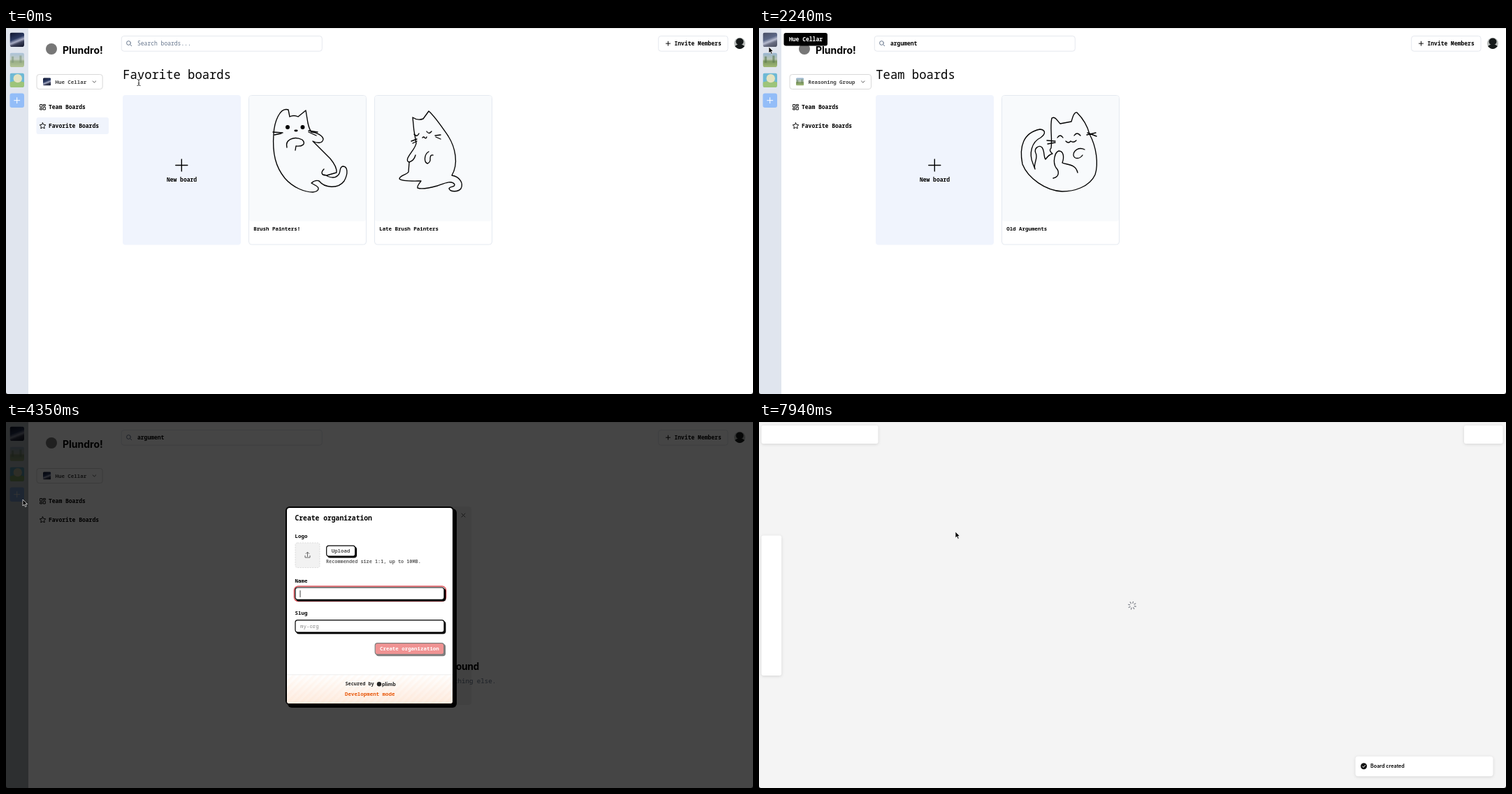
These frames come from a looping animation (1069 px wide and 524 px high, 8 s). An HTML page:

```html
<!DOCTYPE html>
<html lang="en">
<head>
<meta charset="utf-8">
<title>Boards</title>
<style>
html, body { margin: 0; width: 100%; height: 100%; overflow: hidden; background: #fff; }
svg { display: block; }
#stage { width: 100vw; height: 100vh; }
text { font-family: "Noto Sans Mono", "Liberation Mono", monospace; font-weight: 600; white-space: pre; }
.sans { font-family: Inter, "Open Sans", sans-serif; }
.line { fill: none; stroke: #000; stroke-width: 1.35; stroke-linecap: round; stroke-linejoin: round; }
.icon { fill: none; stroke: #111; stroke-width: 1; stroke-linecap: round; stroke-linejoin: round; }
.soft { filter: drop-shadow(0 1px 2px rgba(0,0,0,.13)); }
.panel { filter: drop-shadow(0 3px 6px rgba(0,0,0,.2)); }
</style>
</head>
<body>
<svg id="stage" viewBox="0 0 1069 524" preserveAspectRatio="none">
<defs>
  <linearGradient id="night" x1=".3" x2=".7" y2="1"><stop stop-color="#141c38"/><stop offset=".4" stop-color="#2b3a62"/><stop offset=".6" stop-color="#a9aec6"/><stop offset=".75" stop-color="#3b4059"/><stop offset="1" stop-color="#1b2036"/></linearGradient>
  <linearGradient id="park" x2="0" y2="1"><stop stop-color="#96b4d2"/><stop offset=".45" stop-color="#b8c5b4"/><stop offset=".6" stop-color="#7d9860"/><stop offset="1" stop-color="#a2b976"/></linearGradient>
  <linearGradient id="violet" x2="1" y2="1"><stop stop-color="#3d4df5"/><stop offset="1" stop-color="#7c45f0"/></linearGradient>
  <linearGradient id="peach" x2="0" y2="1"><stop stop-color="#fff"/><stop offset="1" stop-color="#fdece0"/></linearGradient>
  <linearGradient id="peachGrey" x2="0" y2="1"><stop stop-color="#f5f4f4"/><stop offset="1" stop-color="#fae5da"/></linearGradient>
  <pattern id="stripes" width="7" height="7" patternUnits="userSpaceOnUse" patternTransform="rotate(45)"><rect width="3.5" height="7" fill="#f6863b" opacity=".035"/></pattern>
  <symbol id="org0" viewBox="0 0 20 20"><rect width="20" height="20" rx="3" fill="url(#night)"/></symbol>
  <symbol id="org1" viewBox="0 0 20 20"><rect width="20" height="20" rx="3" fill="url(#park)"/><path d="M4 5v9M15 4v10" stroke="#5d7b50" stroke-width="3" opacity=".6"/></symbol>
  <symbol id="org2" viewBox="0 0 20 20"><rect width="20" height="20" rx="3" fill="#43a9cc"/><path d="M0 13Q10 9 20 13V17Q20 20 17 20H3Q0 20 0 17Z" fill="#84b84e"/><ellipse cx="11" cy="7.500" rx="6" ry="6" fill="#e6e3b0"/></symbol>
  <symbol id="org3" viewBox="0 0 20 20"><rect width="20" height="20" rx="3" fill="url(#violet)"/><path d="M6 5H14V15H11.5V12H8.5V15H6Z" fill="#fff"/><path d="M8 7.5h1.3M10.8 7.5h1.3M8 9.8h1.3M10.8 9.8h1.3" stroke="#5549f3"/></symbol>
  <g id="roller" class="line">
    <path d="M404 117C392 113 384 134 383 152C381 180 386 199 399 215C411 229 428 235 439 235C448 234 449 229 444 226L437 222Q443 217 448 219C456 229 475 231 484 219C490 208 489 198 482 198C476 199 480 207 475 211C469 217 461 213 456 210M404 117L406 127Q412 124 418 127L429 118L432 136Q434 145 437 149C444 149 453 154 454 159C453 166 445 165 439 162L464 187Q474 199 473 207L459 211C450 211 451 206 455 202"/>
    <path d="M402 171C399 160 412 154 424 160C430 166 424 170 415 169L414 175M382 149L396 150M384 153L394 151M433 147L446 149M433 149L444 154"/>
    <circle cx="403" cy="142" r="2.3" fill="#000"/><circle cx="424.500" cy="142" r="2.3" fill="#000"/><ellipse cx="415" cy="147" rx="2" ry=".8" fill="#000"/>
  </g>
  <g id="sitter" class="line">
    <path d="M582 128Q589 133 597 130L605 119C615 128 624 142 633 155C643 171 648 194 638 211C650 213 655 223 651 230C647 235 636 235 634 230C635 226 642 229 642 224C638 217 626 223 617 226C606 229 594 231 589 229C588 226 592 222 594 219C585 219 567 220 563 216C563 211 574 210 576 206L577 192Q573 191 575 186C579 178 586 172 587 165Q583 146 582 128"/>
    <path d="M577 192Q584 190 586 182M584 152q4 5 7-1M602 148q3 5 7 0M596 157q2-2 3 0q2 2 3-1M580 162L588 159M582 165L588 162M614 154L622 153M615 156L622 159M605 177C598 181 598 192 603 194Q608 192 607 187Q607 181 611 182"/>
  </g>
  <g id="curl" class="line">
    <path d="M441 160C455 154 463 146 460 133C456 121 441 118 433 124C429 130 435 133 440 131C448 130 453 137 448 145C441 154 425 160 413 166C396 176 390 186 392 200C393 214 404 231 415 235Q421 235 422 231L434 230Q438 236 444 234C458 225 468 207 462 189C458 178 449 168 441 160"/>
    <path d="M405 196Q409 183 413 183Q416 184 419 190H437Q441 182 446 182Q450 187 452 195M422 216q3 4 6 0q3 4 6 0M402 213L413 214M402 220L413 216M447 213L460 214M447 216L460 221"/>
    <circle cx="414" cy="208.500" r="1.8" fill="#000"/><circle cx="442.500" cy="208.500" r="1.8" fill="#000"/>
  </g>
  <g id="ball" class="line">
    <path d="M418 172C420 156 416 143 419 129C424 126 427 133 431 137L447 134C449 127 451 120 455 121C463 129 470 140 473 152C483 170 486 195 481 210C473 228 450 234 434 234C410 233 385 215 377 195C372 170 378 150 402 145C411 146 410 152 403 157C390 163 386 180 392 194L395 202C392 195 400 186 396 179C393 172 401 167 405 171C409 176 407 184 410 188Q415 181 420 180Q414 175 418 172"/>
    <path d="M421 215C430 213 430 205 425 200C420 192 423 178 429 176C436 176 437 185 434 193C440 196 453 194 456 207M466 174C458 170 450 175 450 182C451 188 459 188 463 182M427 157q4-6 8 0M451 154q4-6 9 0M439 162q4 4 7 0q4 3 8-1M412 161L424 162M413 166L424 164M469 153L482 150M470 150L483 155"/>
  </g>
  <g id="loaf" class="line">
    <path d="M732 221C733 211 747 200 760 191C773 181 782 166 781 156L779 137C782 135 788 143 793 147Q802 148 811 145C815 138 820 128 824 128C833 139 837 153 839 164C842 177 836 187 827 193L826 222C802 220 790 223 770 222C755 220 740 224 732 221"/>
    <path d="M778 184L790 182M781 190L790 184M840 173L851 170M840 174L850 179"/>
    <circle cx="796" cy="173.500" r="2.9" fill="#000"/><circle cx="830.500" cy="167.500" r="2.4" fill="#000"/><ellipse cx="817" cy="177" rx="2.6" ry=".8" fill="#000"/>
  </g>
</defs>
<g id="scene"></g>
</svg>
<script>
const LOOP = 8000;
const ORGS = ['Hue Cellar', 'Reasoning Group', 'Parking Council', 'Our Workshop Group'];
const QUERY = 'argument';
const NEW_SLUG = 'our-workshop-group';

// time, x, y of the pointer tip
const PATH = [
  [0, 190, 78], [60, 190, 78], [180, 60, 58], [260, 16, 46], [330, 16, 46], [480, 120, 110], [720, 530, 265], [820, 548, 276.5],
  [880, 548, 276], [1080, 230, 22], [1180, 230, 22], [1480, 1000, 318], [1760, 1000, 320], [2060, 120, 60], [2200, 14, 27],
  [2530, 14, 27], [2600, 15, 18], [2700, 15, 18], [3060, 674, 177], [3350, 842, 240], [3410, 797, 270], [3700, 420, 440],
  [4000, 40, 125], [4180, 24, 111], [5560, 24, 111], [5790, 580, 325], [5900, 580, 325], [6150, 320, 190], [6400, 86, 76],
  [6680, 86, 76], [6860, 600, 395], [7000, 1040, 22], [7180, 22, 46], [7260, 16, 46], [7340, 16, 46], [7560, 281, 157], [8000, 281, 157]
];
// time, organization, view
const STATES = [[0, 0, 'favorites'], [300, 1, 'team'], [1870, 1, 'found'], [2650, 0, 'none'], [5960, 3, 'none'], [7300, 1, 'found'], [7640, 1, 'canvas']];

// x, picture, picture offset, title
const CARDS = {
  favorites: [[347.5, 'roller', 0, 'Brush Painters!'], [527.5, 'sitter', 0, 'Late Brush Painters']],
  team: [[347.5, 'curl', 0, "Velk's Verdict"], [527.5, 'ball', 180, 'Old Arguments'], [707, 'loaf', 0, 'Quorvenstolt Grammars']],
  found: [[347.5, 'ball', 0, 'Old Arguments']],
  none: []
};

const clamp = v => Math.max(0, Math.min(1, v));
const text = (x, y, size, str, attrs = '') => `<text x="${x}" y="${y}" font-size="${size}" ${attrs}>${str}</text>`;
const rect = (x, y, w, h, fill, r = 0, attrs = '') => `<rect x="${x}" y="${y}" width="${w}" height="${h}" rx="${r}" fill="${fill}" ${attrs}/>`;
const icon = (d, attrs = '') => `<path class="icon" d="${d}" ${attrs}/>`;
const avatar = (i, x, y, s, opacity = 1) => `<use href="#org${i}" x="${x}" y="${y}" width="${s}" height="${s}" opacity="${opacity}"/>`;
const inside = (p, x, y, w, h) => p.x >= x && p.x <= x + w && p.y >= y && p.y <= y + h;
const buttonWidth = org => ORGS[org].length * 4.47 + 49.5;
const BOLD = 'style="font-weight:700"';
const GREY = 'fill="#64748b" style="font-weight:500"';

function pointerAt(t) {
  const i = PATH.findIndex(p => p[0] > t);
  const [t0, x0, y0] = PATH[i - 1], [t1, x1, y1] = PATH[i];
  const k = (t - t0) / (t1 - t0), e = k * k * (3 - 2 * k);
  return { x: x0 + (x1 - x0) * e, y: y0 + (y1 - y0) * e };
}

function pointer(p, kind) {
  const shapes = {
    arrow: '<path d="M0 0V9L2.1 7.100L3.600 10.400L5.200 9.700L3.700 6.500H6.500Z" fill="#000" stroke="#fff" stroke-width=".7"/>',
    hand: '<path d="M-.5 .8Q.6-.6 1.500 .8L2.200 3.500Q5 3.300 5.600 5.500Q6 8 4.500 10H.2L-2.600 6.300Q-2.300 5 -.4 6.100Z" fill="#fff" stroke="#000" stroke-width=".8"/>',
    beam: '<path d="M-2.500-4.500Q0-4.500 0-3V3Q0 4.500-2.500 4.500M2.500-4.500Q0-4.500 0-3M0 3Q0 4.500 2.500 4.500M-1.200 1H1.200" fill="none" stroke="#222" stroke-width=".9"/>'
  };
  return `<g transform="translate(${p.x} ${p.y})">${shapes[kind]}</g>`;
}

function sidebar(org) {
  let out = rect(0, 0, 32, 524, '#e0e5ee');
  for (let i = 0; i < 3; i++) out += avatar(i, 5.5, 6.5 + 29 * i, 20.5, i === org ? 1 : .72);
  return out + rect(5.5, 93.5, 20.5, 20.5, '#93bdf8', 3) + icon('M15.700 99.700v8M11.700 103.700h8', 'style="stroke:#fff"');
}

function header(query, org, pressed) {
  const w = buttonWidth(org);
  return '<circle cx="65" cy="30" r="8" fill="#777"/>'
    + text(81, 37, 14, 'Plundro!', 'class="sans" ' + BOLD)
    + rect(44, 66.5, w, 21, pressed ? '#f6f6f6' : '#fff', 3.5, `stroke="${pressed ? '#c9c9c9' : '#d9d9d9'}"`)
    + avatar(org, 53, 71.3, 11.3) + text(70.5, 79.5, 7.45, ORGS[org], 'fill="#444"')
    + icon(`M${30 + w} 76l2.200 2.200l2.200-2.200`, 'style="stroke:#555"')
    + icon('M49 109.500h2.700v3.700H49zM53.600 109.500h2.700v2H53.600zM53.600 113.300h2.700v3.700H53.600zM49 115h2.700v2H49z')
    + text(61, 115.8, 8, 'Team Boards')
    + rect(165.3, 11.5, 287, 21.7, '#fff', 3.5, 'stroke="#e5e8ee"')
    + '<circle class="icon" cx="175.500" cy="21.500" r="2.900" style="stroke:#64748b"/>' + icon('M177.700 23.700l2 2', 'style="stroke:#64748b"')
    + text(188, 24.8, 8, query || 'Search boards...', query ? '' : GREY)
    + rect(933.7, 11.5, 99.3, 21.7, '#fff', 3.5, 'stroke="#e5e8ee"')
    + icon('M947.500 19.200v6M944.500 22.200h6') + text(956.5, 24.8, 8, 'Invite Members')
    + '<circle cx="1050" cy="22" r="8" fill="#b9bdbb"/><path d="M1043 26Q1050 20 1057 26Q1050 34 1043 26Z" fill="#161a1a"/><ellipse cx="1050" cy="19.500" rx="5.500" ry="5" fill="#161a1a"/>';
}

function favoritesLink(active) {
  return (active ? rect(43.5, 128, 103.5, 24, '#f0f4fc', 3) : '')
    + icon('M52.500 135.700l1.300 2.700l3 .4l-2.200 2.100l.6 3l-2.700-1.400l-2.700 1.400l.6-3l-2.200-2.100l3-.4z')
    + text(61, 142.6, 8, 'Favorite Boards');
}

function card([x, art, dx, title], hovered) {
  let out = rect(x, 96.5, 168, 213.5, '#fff', 4, 'stroke="#e4e9f0"')
    + rect(x + .5, 97, 167, 179.5, '#f8fafc', 3) + `<use href="#${art}" x="${dx}"/>` + text(x + 6.7, 290.4, 7.45, title);
  if (hovered) out += rect(x, 96.5, 168, 180, 'rgba(0,0,0,.5)', 3)
    + [0, 4, 8].map(d => `<circle cx="${x + 147.5 + d}" cy="110" r="1.100" fill="#ddd"/>`).join('')
    + text(x + 6.7, 300, 6.33, 'You, 32 minutes ago', GREY)
    + icon(`M${x + 156.5} 283.700l1.300 2.700l3 .4l-2.200 2.100l.6 3l-2.700-1.400l-2.700 1.400l.6-3l-2.200-2.100l3-.4z`, 'style="stroke:#d9541e"');
  return out;
}

function content(view, p) {
  if (view === 'none') return '<use href="#curl" transform="translate(285 118.200) scale(.757)"/>'
    + text(611, 355, 13.75, 'No results found', 'text-anchor="middle" ' + BOLD)
    + text(611, 374, 9.12, 'Try searching for something else.', 'text-anchor="middle" ' + GREY);
  return text(167.3, 72.8, 17.2, view === 'favorites' ? 'Favorite boards' : 'Team boards', 'style="font-weight:400"')
    + rect(167, 96, 169, 214.5, '#f0f4fd', 4) + icon('M251.300 188v17M242.800 196.500h17', 'style="stroke:#000;stroke-width:1.400"')
    + text(251.5, 219.8, 8, 'New board', 'text-anchor="middle"')
    + CARDS[view].map(c => card(c, inside(p, c[0], 96, 168, 214))).join('');
}

function tooltip(p) {
  const i = Math.floor((p.y - 4) / 29);
  if (p.x > 27 || i < 0 || i > 3) return '';
  const label = i < 3 ? ORGS[i] : 'Create organization';
  return rect(35.5, 7 + 29 * i, label.length * 4.8 + 14.5, 18.5, '#000', 3) + text(43, 19 + 29 * i, 8, label, 'fill="#fff" ' + BOLD);
}

function securedBy(x, y, color) {
  return text(x, y, 6.87, 'Secured by', `fill="${color}"`)
    + `<circle cx="${x + 48.5}" cy="${y - 2}" r="3.200" fill="${color}"/>`
    + text(x + 52.5, y + .8, 7.3, 'plimb', `class="sans" fill="${color}" ` + BOLD)
    + text(x - .5, y + 14.3, 7.45, 'Development mode', 'fill="#e8590c"');
}

const raised = (x, y, w, h, fill = '#fff') => rect(x + 1.2, y + 1.2, w + 1.2, h + 1.2, '#000', 4) + rect(x, y, w, h, fill, 3.5, 'stroke="#000" stroke-width="1.200"');

function dialog(t) {
  const typed = Math.floor(clamp((t - 4740) / 790) * ORGS[3].length);
  const name = ORGS[3].slice(0, typed), slug = NEW_SLUG.slice(0, typed);
  const show = clamp((t - 4200) / 120) * (1 - clamp((t - 5900) / 120));
  const caret = t < 4760 && t % 1000 > 600 ? '' : icon(`M${421 + typed * 4.47} 241.500v9`, 'style="stroke-width:.8"');
  return `<g opacity="${show}">` + rect(0, 0, 1069, 524, 'rgba(0,0,0,.73)') + rect(0, 0, 32, 524, 'rgba(0,0,0,.25)') + rect(400, 121, 266, 284, 'rgba(0,0,0,.06)', 4)
    + icon('M652 131l5 5M657 131l-5 5', 'style="stroke:#1a1a1a"')
    + rect(403, 124, 242, 285, '#000', 6) + rect(401, 122, 239, 282, '#fff', 5, 'stroke="#000" stroke-width="2"')
    + rect(402, 362, 237, 41, 'url(#peach)', 3) + rect(402, 362, 237, 41, 'url(#stripes)', 3) + rect(402, 361.5, 237, .7, '#e6e6e6')
    + text(413.5, 141.3, 9.7, 'Create organization', BOLD)
    + text(413.5, 165.8, 7.45, 'Logo', BOLD) + text(413.5, 229.5, 7.45, 'Name', BOLD) + text(413.5, 276.3, 7.45, 'Slug', BOLD)
    + rect(414, 173, 35, 35.5, '#f2f2f2', 3, 'stroke="#d5d5d5" stroke-width=".8" stroke-dasharray="2 1.500"')
    + icon('M431.500 192.500v-6M429.200 188.500l2.300-2.300l2.300 2.300M428 191.500v2.500h7v-2.500', 'style="stroke:#666"')
    + raised(458.7, 177.2, 41, 15) + text(465.7, 187, 7.45, 'Upload', 'fill="#555"')
    + text(458, 202.3, 6.87, 'Recommended size 1:1, up to 10MB.', 'fill="#666"')
    + rect(412.4, 235.2, 217.2, 21.4, 'none', 5.5, 'stroke="#d8353c" stroke-width="1.200"')
    + raised(414, 237, 213, 17.3) + text(421, 248.6, 7.45, name) + caret
    + raised(414, 283.7, 213, 17.3) + text(421, 295.3, 7.45, slug || 'my-org', slug ? '' : 'fill="#888" style="font-weight:500"')
    + `<g opacity="${typed ? 1 : .5}">` + raised(528.2, 316.6, 98.5, 16.2, '#e22a2a') + '</g>'
    + text(535, 327.3, 7.45, 'Create organization', 'fill="#fff" ' + BOLD)
    + securedBy(485.5, 377.2, '#222') + '</g>';
}

function menu() {
  let out = `<g class="panel">${rect(44, 92.5, 209, 232.5, '#fff', 5)}</g>`
    + '<path d="M44 283H253V320Q253 325 248 325H49Q44 325 44 320Z" fill="url(#peachGrey)"/><path d="M44 283H253V320Q253 325 248 325H49Q44 325 44 320Z" fill="url(#stripes)"/>'
    + avatar(3, 55.5, 101.7, 20.5) + text(82.3, 109.5, 7.45, ORGS[3], BOLD) + text(82.3, 119.5, 7.45, 'Admin')
    + '<circle cx="234" cy="112.300" r="2.100" fill="none" stroke="#222" stroke-width="1.200"/><circle cx="234" cy="112.300" r="3.200" fill="none" stroke="#222" stroke-width="1" stroke-dasharray="1.250"/>';
  for (let i = 0; i < 3; i++) {
    const y = 131 + 38.5 * i;
    out += rect(44, y, 209, .7, '#e8e8e8') + avatar(i, 55.5, y + 9.2, 20.5) + text(82.3, y + 22, 7.45, ORGS[i], 'fill="#555"');
  }
  return out + rect(44, 246.5, 209, .7, '#e8e8e8') + rect(44, 283, 209, .7, '#e3e0df')
    + '<circle cx="65.700" cy="264.800" r="6.500" fill="#e9e9e9" stroke="#d8d8d8" stroke-width=".6"/>' + icon('M65.700 262.500v4.600M63.400 264.800h4.600', 'style="stroke:#555"')
    + text(84.5, 267.5, 7.45, 'Create organization', 'fill="#555"') + securedBy(113.3, 298.7, '#5b5b5f');
}

function canvasPage(t) {
  const spin = Math.floor((t - 7940) / 60) * 45 + 15;
  const rise = (1 - clamp((t - 7700) / 150)) * 55;
  let spokes = '';
  for (let a = 0; a < 360; a += 45) spokes += `<path d="M0-3.400V-5.600" transform="rotate(${a})"/>`;
  return rect(0, 0, 1069, 524, '#f4f4f4')
    + [[3.5, 5, 167, 26], [1009, 5, 55.5, 26], [3.5, 162.5, 28.7, 200.5]].map(b => `<g class="soft">${rect(...b, '#fff', 3)}</g>`).join('')
    + `<g transform="translate(534 262.700) rotate(${spin})" stroke="#7b7f87" stroke-width="1.150" stroke-linecap="round">${spokes}</g>`
    + `<g transform="translate(0 ${rise})"><g class="soft">${rect(853.5, 478.7, 197, 28.5, '#fff', 4)}</g><circle cx="865.500" cy="492.800" r="4.500" fill="#111"/>`
    + icon('M863.500 493l1.400 1.400l2.600-2.900', 'style="stroke:#fff"') + text(875, 495.4, 7.2, 'Board created', 'class="sans"') + '</g>';
}

function draw(t) {
  const [, org, view] = STATES.findLast(s => s[0] <= t);
  const p = pointerAt(t);
  const modal = t >= 4200 && t < 6020;
  const edges = rect(0, 0, 1069, .8, '#e3e3e3') + '<path d="M0 521Q0 524 3 524H0ZM1069 520.500Q1069 524 1065.500 524H1069Z" fill="#222"/>';
  if (view === 'canvas') return canvasPage(t) + edges + pointer(p, 'arrow');

  const query = QUERY.slice(0, Math.max(0, Math.floor((t - 1270) / 47)));
  const overCard = CARDS[view].some(c => inside(p, c[0], 96, 168, 214));
  const overOrg = inside(p, 44, 66, buttonWidth(org), 22);
  const overNew = view !== 'none' && inside(p, 167, 96, 169, 214);
  const overText = inside(p, 165, 11, 287, 22) || (view !== 'none' && inside(p, 167, 55, 154, 28));
  const kind = modal ? 'arrow' : overCard || overOrg || overNew ? 'hand' : overText ? 'beam' : 'arrow';

  let out = rect(0, 0, 1069, 524, '#fff') + sidebar(org) + header(query, org, overOrg && !modal)
    + favoritesLink(view === 'favorites') + content(view, p);
  if (t > 1120 && t < 2000) out += rect(164, 10, 289.6, 24.5, 'none', 4.5, 'stroke="#94a3b8" stroke-width="1.100"');
  if (overCard) out += rect(0, 515, 178, 9, 'rgba(225,227,231,.55)', 1.5) + text(3, 521.7, 6, 'open the board that is under the pointer', 'fill="#fff"');
  if (t >= 6500 && t < 6770) out += menu();
  out += modal ? edges + dialog(t) : tooltip(p) + edges;
  return out + pointer(p, kind);
}

const scene = document.getElementById('scene');
const start = performance.now();
let last = '';
function tick() {
  const next = draw((performance.now() - start) % LOOP);
  if (next !== last) scene.innerHTML = last = next;
  requestAnimationFrame(tick);
}
tick();
</script>
</body>
</html>
```
